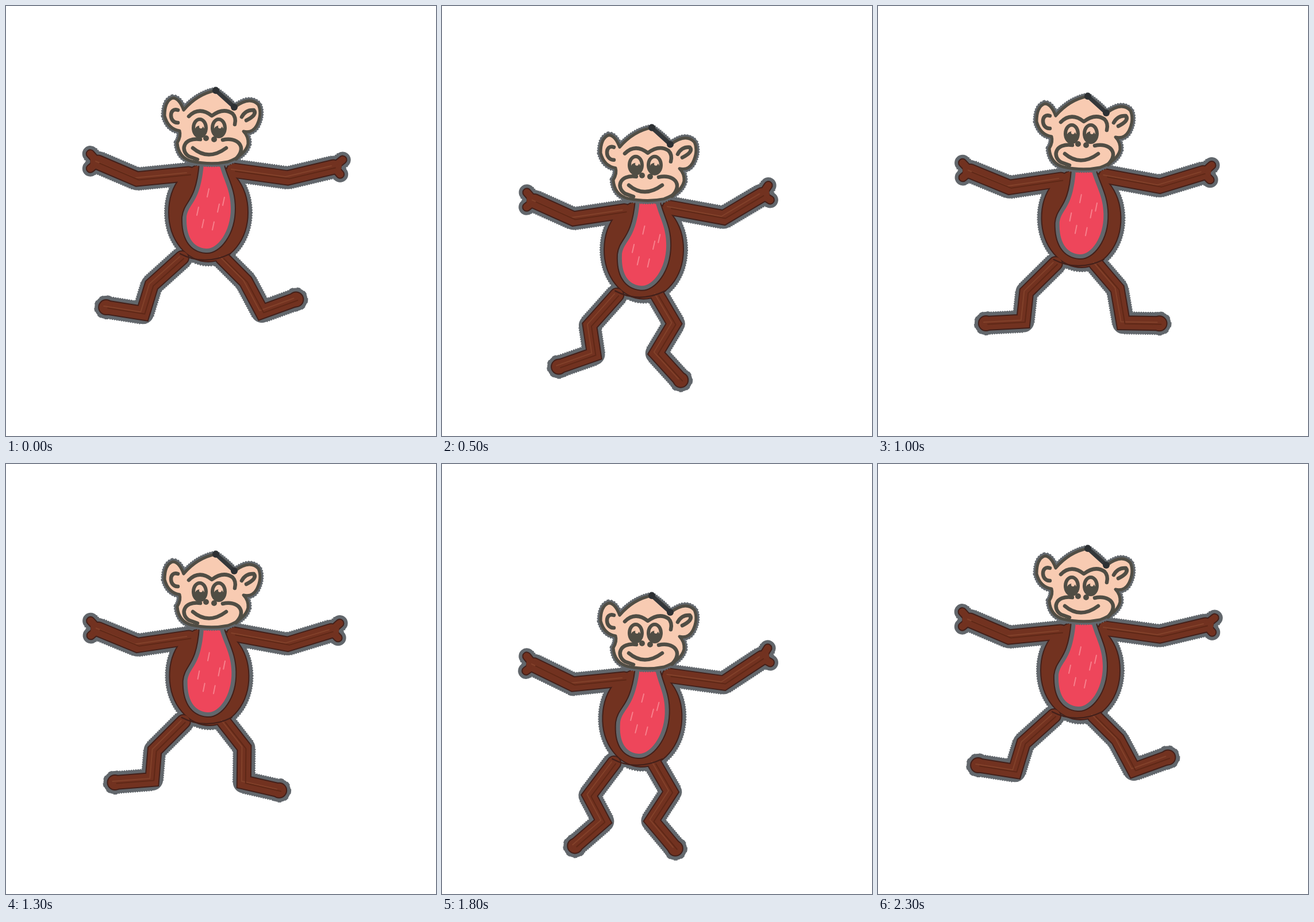
Animation of 748x748 px, one loop 2400 ms. Source, as an HTML page with a canvas:

```html
<!DOCTYPE html>
<html lang="en">
<head>
<meta charset="utf-8">
<title>Dancing monkey</title>
<style>
html, body { margin: 0; width: 100%; height: 100%; overflow: hidden; background: #fff; }
canvas { display: block; }
</style>
</head>
<body>
<canvas id="stage" width="748" height="748"></canvas>
<script>
const ctx = document.getElementById('stage').getContext('2d');
const GREY = '#62676c', DARK = '#43201a', BROWN = '#723220', SKIN = '#f8cbb2', INK = '#504d44', RED = '#ee465b';

const HEAD = new Path2D(`M365 147Q333 153 309 181Q301 160 290 160Q276 165 276 191Q282 214 302 217
  Q305 226 298 238Q300 264 323 270Q356 277 386 271Q416 260 421 240Q422 227 413 218
  Q428 222 436 208Q446 188 439 172Q424 156 398 176Q384 160 365 147Z`);
const FACE = new Path2D(`M318 192Q336 174 358 191Q378 176 394 187Q401 194 398 206
  M338 232C308 228 302 252 319 262L333 267M377 233C402 227 421 245 400 266
  M325 247Q352 270 383 247M299 181C283 175 283 204 299 203M410 193Q417 180 431 181Q438 189 418 199`);
const BELLY = new Path2D(`M344 275H371C379 305 391 320 391 352C391 395 366 424 348 422
  C324 420 313 400 314 368C317 342 338 345 344 275Z`);

// Linear motion through [time, value] points, holding the last value
function track(t, points) {
  const i = points.findIndex(p => p[0] > t);
  if (i < 0) return points.at(-1)[1];
  const [t0, a] = points[i - 1], [t1, b] = points[i];
  return a + (b - a) * (t - t0) / (t1 - t0);
}

const mix = (a, b, u) => a + (b - a) * u;

function step([x, y], length, degrees) {
  const a = degrees * Math.PI / 180;
  return [x + length * Math.cos(a), y + length * Math.sin(a)];
}

function line(pts) {
  const path = new Path2D();
  pts.forEach(p => path.lineTo(...p));
  return path;
}

function circle(x, y, r) {
  const path = new Path2D();
  path.arc(x, y, r, 0, 7);
  return path;
}

function stroke(path, color, width) {
  ctx.strokeStyle = color;
  ctx.lineWidth = width;
  ctx.stroke(path);
}

function fill(path, color) {
  ctx.fillStyle = color;
  ctx.fill(path);
}

// Wide marker line with a slightly ragged edge
function marker(path, width) {
  stroke(path, GREY, width);
  ctx.lineCap = 'butt';
  ctx.setLineDash([2, 2]);
  stroke(path, GREY, width + 2);
  ctx.setLineDash([]);
  ctx.lineCap = 'round';
}

function leg(hip, bend, sizes, straight, bent) {
  const joints = [hip];
  sizes.forEach((size, i) => joints.push(step(joints[i], size, mix(straight[i], bent[i], bend))));
  return [
    { path: line(joints), width: 22, joints },
    { path: circle(...joints[3], 6), width: 12 }
  ];
}

function arm(shoulder, elbow, wrist, side) {
  const angle = Math.atan2(wrist[1] - elbow[1], wrist[0] - elbow[0]) * 180 / Math.PI;
  const joints = [shoulder, elbow, wrist];
  const fingers = [step(wrist, 20, angle - 25 * side), wrist, step(wrist, 17, angle + 62 * side)];
  return [
    { path: line(joints), width: 23, joints },
    { path: line(fingers), width: 12 }
  ];
}

function drawHead(y) {
  ctx.save();
  ctx.translate(0, y);
  marker(HEAD, 11);
  fill(HEAD, SKIN);
  stroke(HEAD, INK, 5);
  stroke(FACE, INK, 6.5);
  for (const x of [337, 370]) {
    const ring = new Path2D();
    ring.ellipse(x, 212, 11, 15, 0, 0, 7);
    stroke(ring, INK, 6);
    fill(circle(x, 217, 9), INK);
    fill(circle(x + 2, 210, 3), SKIN);
  }
  fill(circle(348, 230, 5), INK);
  fill(circle(362, 232, 5), INK);
  stroke(line([[365, 147], [397, 176]]), '#34373a', 7);
  fill(circle(365, 147, 6), '#2d3033');
  fill(circle(397, 176, 6), '#2d3033');
  ctx.restore();
}

function drawBelly(y, lean) {
  ctx.save();
  ctx.transform(1, 0, lean, 1, -270 * lean, y);
  stroke(new Path2D('M303 431Q345 453 390 431'), DARK, 2.5);
  stroke(BELLY, DARK, 18);
  stroke(BELLY, GREY, 14);
  fill(BELLY, RED);
  for (let i = 0; i < 6; i++) {
    const x = 332 + 9 * i, top = 350 + 32 * Math.sin(i * 2.4);
    stroke(line([[x, top + 14], [x + 3, top]]), '#f7808c', 2);
  }
  ctx.restore();
}

function draw(t) {
  const beat = t % 1200;
  const y = track(beat, [[0, 0], [300, 30], [600, 82], [800, 30], [1100, 0]]);
  const lag = track(beat, [[0, 0], [300, 1], [600, 0], [800, 1], [1100, 0]]);
  const bendR = track(beat, [[0, 0], [100, .47], [300, .9], [600, 1], [800, .9], [1100, 0]]);
  const bendL = t < 1200
    ? track(t, [[0, 0], [300, .2], [600, .75], [800, .72], [1100, 0]])
    : track(beat, [[0, 0], [100, .27], [600, 1], [800, 1], [1100, 0]]);

  const lean = .065 * lag - .0005 * y;
  const place = (px, py) => [px + lean * (py - 270), py + y];
  const torso = new Path2D();
  torso.ellipse(...place(352, 359), 66, 83, -lean, 0, 7);

  const parts = [
    ...arm(place(318, 292), [228 + 2 * lag, 301 + y + 13 * lag], [160 + 2 * lag, 272 + .95 * y + 18 * lag], -1),
    ...arm(place(396, 286), [490, 299 + y + 13 * lag], [570 - 8 * lag - .17 * y, 280 + .7 * y + 10 * lag], 1),
    ...leg(place(306, 438), bendL, [71, 51, 65], [138, 107, 189], [127, 62, 139]),
    ...leg(place(376, 438), bendR, [58, 60, 63], [45, 62, -20], [60, 123, 50]),
    { path: torso, width: 4, solid: true }
  ];

  ctx.fillStyle = '#fff';
  ctx.fillRect(0, 0, 748, 748);
  ctx.lineCap = ctx.lineJoin = 'round';
  for (const p of parts) marker(p.path, p.width + 16);
  ctx.lineJoin = 'miter';
  ctx.miterLimit = 3;
  for (const [color, extra] of [[DARK, 4], [BROWN, 0]]) {
    for (const p of parts) {
      stroke(p.path, color, p.width + extra);
      if (p.solid || p.width === 12) fill(p.path, color);
    }
  }
  ctx.lineJoin = 'round';
  for (const { joints } of parts.filter(p => p.joints)) {
    for (const [shift, color] of [[-4, '#82412a'], [3, '#5f2817']])
      stroke(line(joints.map(([px, py]) => [px + shift, py + shift / 2])), color, 2);
  }
  drawBelly(y, lean);
  drawHead(y);
}

function tick() {
  draw(Math.floor(performance.now() % 2400 / 100) * 100);
  requestAnimationFrame(tick);
}
tick();
</script>
</body>
</html>
```
